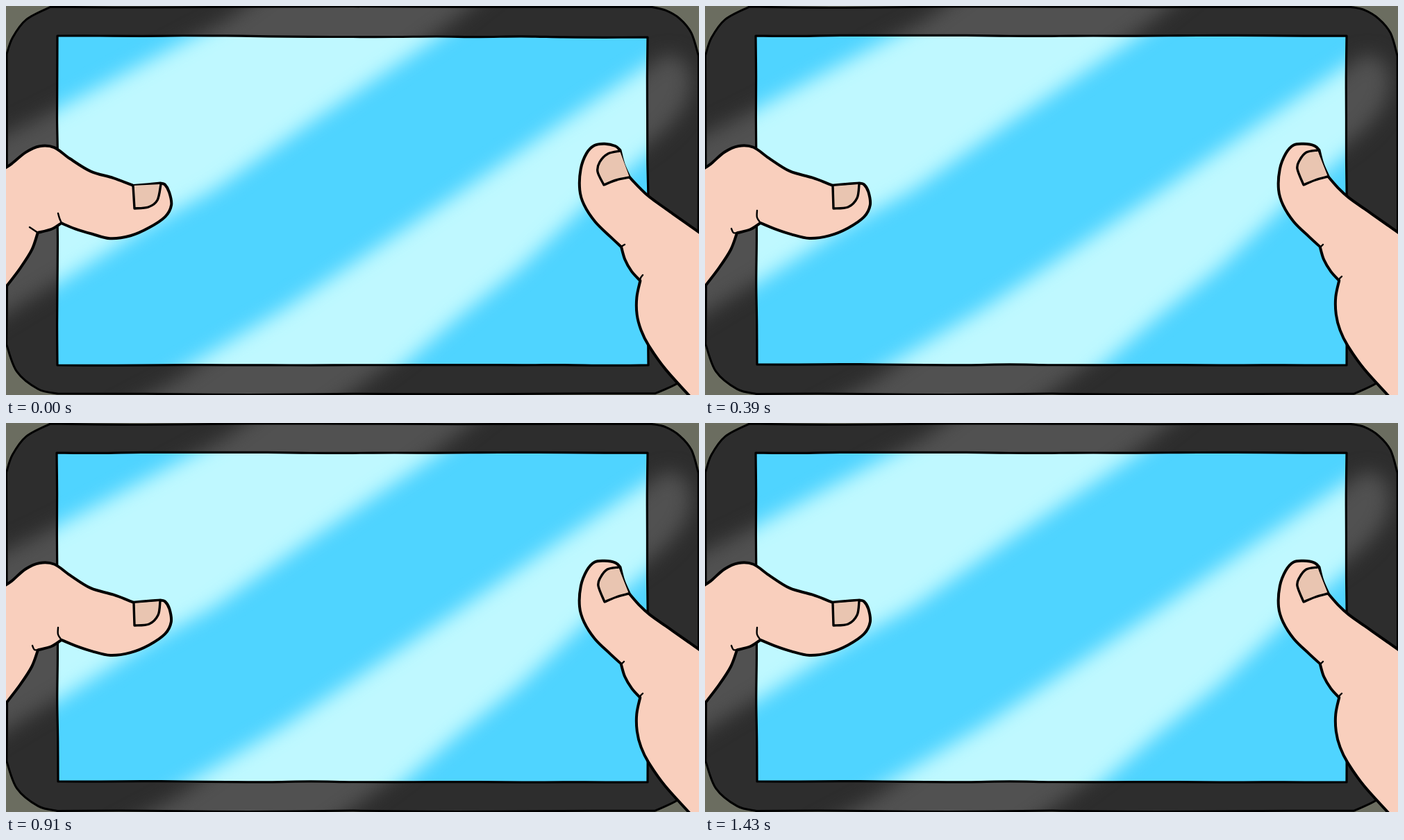
An HTML page that plays this animation: 998 px wide and 561 px high, repeating every 1560 ms.

```html
<!DOCTYPE html>
<html lang="en">
<head>
<meta charset="utf-8">
<title>Hands holding a tablet</title>
<style>
  html, body { margin: 0; width: 100%; height: 100%; overflow: hidden; background: #6b6d60; }
  svg { display: block; width: 100vw; height: 100vh; }
  .ink { stroke: #000; stroke-linejoin: round; stroke-linecap: round; fill: none; }
</style>
</head>
<body>
<svg viewBox="0 0 998 561" preserveAspectRatio="none">
  <defs>
    <filter id="soft" filterUnits="userSpaceOnUse" x="-100" y="-100" width="1200" height="760" color-interpolation-filters="sRGB">
      <feGaussianBlur stdDeviation="14"/>
    </filter>
    <clipPath id="bodyClip"><path id="bodyShape"/></clipPath>
    <clipPath id="screenClip"><rect x="74" y="44" width="850" height="474"/></clipPath>
  </defs>
  <g clip-path="url(#bodyClip)">
    <rect width="998" height="561" fill="#2d2d2d"/>
    <g filter="url(#soft)" fill="#515151">
      <path d="M-60 214L75 148 315 22 400 -40 720 -40 640 24 400 200 75 398-60 480Z"/>
      <path d="M150 590L245 540 330 480 600 480 520 540 450 590Z"/>
      <path d="M890 118L945 72Q985 66 986 112Q984 165 890 222Z"/>
    </g>
  </g>
  <g clip-path="url(#screenClip)">
    <rect width="998" height="561" fill="#4fd4ff"/>
    <g filter="url(#soft)" fill="#bff8ff">
      <path d="M-50 214L75 148 265 47 430 -42 750 -42 610 53 440 167 300 265 210 314 75 400-50 472Z"/>
      <path d="M1020 18L922 86 800 168 650 271 500 371 400 437 280 508 150 585 490 590 575 515 650 450 740 378 830 292 922 215 1020 150Z"/>
    </g>
  </g>
  <g id="lines"></g>
</svg>
<script>
const STEP = 130;
const SKIN = '#f9cfbd', NAIL = '#e9c5b1';

const BODY = '1 70 9 46 29 19 64 1 | 200 2 350 1 500 1 650 2 800 1 930 1 | 950 6 970 18 987 39 997 72 | ' +
  '997 200 997 350 997 490 | 990 522 968 544 935 559 | 800 559 650 560 500 559 350 560 200 559 74 559 | ' +
  '46 552 16 527 1 488 | 2 400 1 250 1 70';

const LEFT = '-6 237 8 228 28 211 48 202 70 204 92 220 122 238 155 248 183 259 | 205 257 223 256 | ' +
  '229 257 235 268 238 287 229 304 206 320 179 331 150 335 124 329 100 321 80 313 | ' +
  '66 322 46 327 | 37 351 21 377 0 405 -8 414';

const RIGHT = '1006 332 985 317 960 300 927 276 912 262 898 247 | 890 228 884 208 | ' +
  '878 202 862 199 847 201 836 213 828 235 826 265 833 287 848 311 870 333 886 347 | ' +
  '891 366 901 383 913 396 | 908 420 909 445 915 468 926 490 950 524 992 570 | 1006 570';

// Hand-drawn details that differ between the four drawings
const DRAWINGS = [
  { box: [74, 43, 924, 45, 925, 518, 74, 518],
    creases: ['75 299 77 306 80 313', '34 319 40 323 46 327', '886 347 891 344', '913 396 914 392 917 388'],
    leftNail: '183 259 | 185 292 | 205 290 218 280 223 257',
    rightNail: '884 209 867 213 855 225 852 239 861 258 | 879 251 898 247' },
  { box: [75, 44, 924, 43, 924, 517, 73, 518],
    creases: ['76 296 76 304 82 313', '34 318 39 325 47 327', '886 348 894 341', '913 398 914 391 918 386'],
    leftNail: '183 261 185 291 | 205 291 217 280 222 257',
    rightNail: '883 207 866 213 856 224 852 235 861 258 | 880 251 897 246' },
  { box: [74, 43, 925, 43, 923, 517, 73, 518],
    creases: ['77 298 78 306 81 313', '31 320 38 324 46 327', '887 347 893 342', '914 395 917 390 922 387'],
    leftNail: '184 260 | 184 292 | 205 289 219 279 223 257',
    rightNail: '885 209 867 213 854 226 853 240 862 259 | 880 251 899 248' },
  { box: [73, 43, 924, 43, 924, 518, 75, 517],
    creases: ['75 295 75 305 80 313', '38 321 41 327 47 327', '887 347 890 344', '913 397 914 393 917 390'],
    leftNail: '184 260 | 185 292 | 206 290 219 277 222 257',
    rightNail: '882 208 866 211 856 223 853 235 862 258 | 879 251 897 246' }
];

function seeded(seed) {
  return () => {
    seed = (seed * 16807) % 2147483647;
    return seed / 2147483647 - 0.5;
  };
}

// Smooth runs of points, with a sharp corner at every "|"
function curve(text, rand = () => 0, amount = 0) {
  let last = null, d = '';
  for (const run of text.split('|')) {
    const nums = run.trim().split(' ').map(n => +n + rand() * amount);
    const pts = last ? [last] : [];
    for (let i = 0; i < nums.length; i += 2) pts.push([nums[i], nums[i + 1]]);
    if (!last) d = 'M' + pts[0];
    for (let i = 0; i < pts.length - 1; i++) {
      const a = pts[i - 1] || pts[i], b = pts[i], c = pts[i + 1], e = pts[i + 2] || c;
      const c1 = b.map((v, k) => v + (c[k] - a[k]) / 6);
      const c2 = c.map((v, k) => v - (e[k] - b[k]) / 6);
      d += `C${c1} ${c2} ${c}`;
    }
    last = pts[pts.length - 1];
  }
  return d;
}

function wobblyBox(box, rand) {
  const sides = [];
  for (let s = 0; s < 4; s++) {
    const [x, y, u, v] = [0, 1, 2, 3].map(k => box[(s * 2 + k) % 8]);
    const parts = s % 2 ? 8 : 14, pts = s ? [] : [x, y];
    for (let i = 1; i < parts; i++) {
      const t = i / parts;
      pts.push(x + (u - x) * t + rand() * 1.5, y + (v - y) * t + rand() * 1.5);
    }
    sides.push(pts.concat(u, v).join(' '));
  }
  return curve(sides.join(' | '));
}

const ink = (d, width, fill = 'none') =>
  `<path class="ink" d="${d}" stroke-width="${width}" style="fill:${fill}"/>`;

function drawing(spec, index) {
  const rand = seeded(7919 * (index + 3));
  const [a, b, c, e] = spec.creases.map(p => ink(curve(p), 2.4));
  return '<g>' +
    ink(curve(BODY, rand, 1) + 'Z', 3) +
    ink(wobblyBox(spec.box, rand) + 'Z', 3.2) +
    ink(curve(LEFT, rand, 1) + 'Z', 4, SKIN) +
    ink(curve(spec.leftNail), 3.4, NAIL) + a + b +
    ink(curve(RIGHT, rand, 1) + 'Z', 4, SKIN) +
    ink(curve(spec.rightNail), 3.4, NAIL) + c + e +
    '</g>';
}

document.getElementById('bodyShape').setAttribute('d', curve(BODY) + 'Z');
const lines = document.getElementById('lines');
lines.innerHTML = DRAWINGS.map(drawing).join('');

function tick() {
  const now = Math.floor(performance.now() / STEP) % DRAWINGS.length;
  [...lines.children].forEach((g, i) => { g.style.display = i === now ? '' : 'none'; });
  requestAnimationFrame(tick);
}
tick();
</script>
</body>
</html>
```
